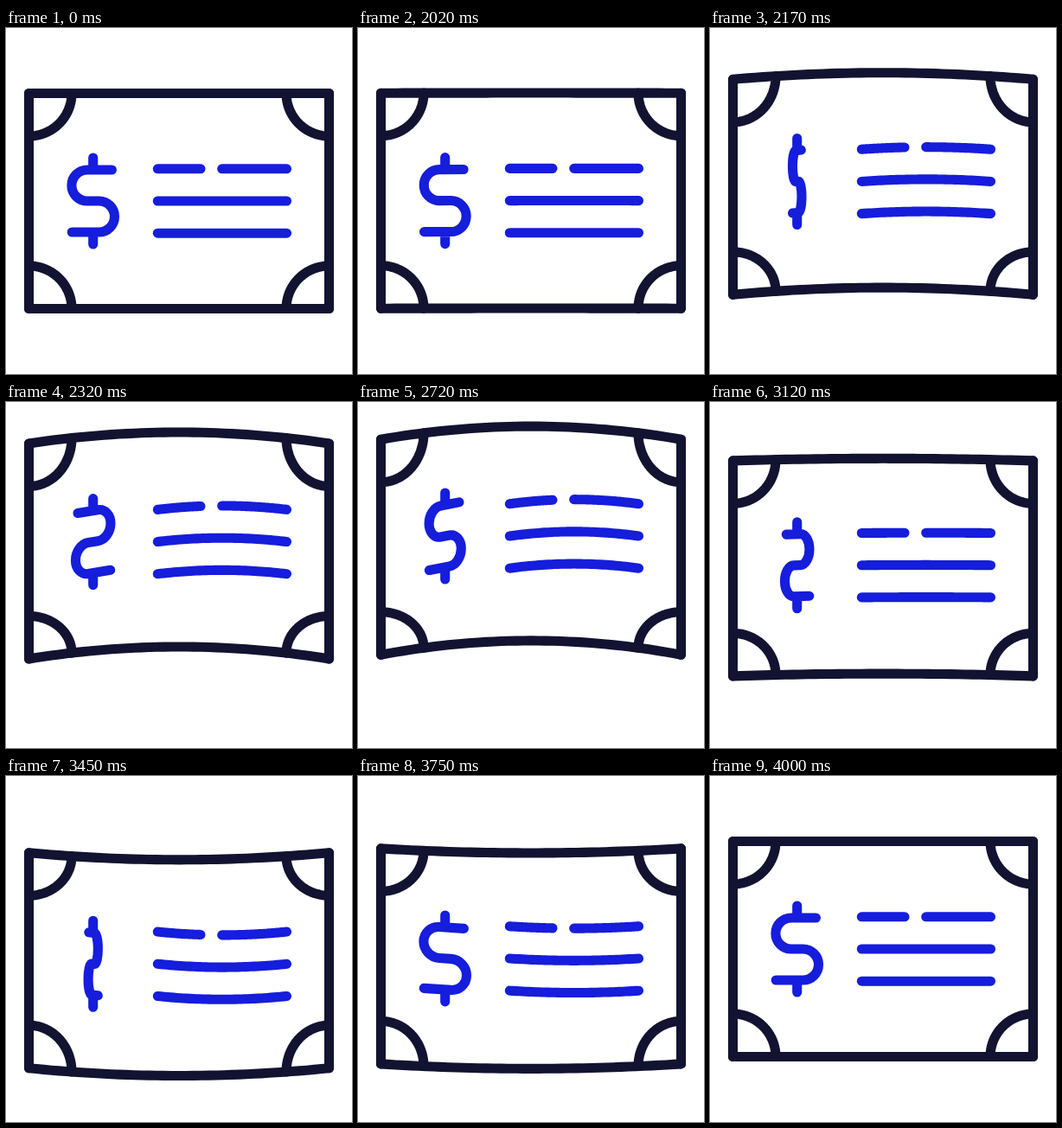
These frames come from a looping animation (400x400 px, 4.02 s). An HTML page with a canvas:

```html
<!DOCTYPE html>
<html lang="en">
<head>
<meta charset="utf-8">
<title>Banknote</title>
<style>
  html, body { margin: 0; height: 100%; overflow: hidden; background: #fff; }
  canvas { display: block; }
</style>
</head>
<body>
<canvas id="stage" width="400" height="400"></canvas>
<script>
const ctx = document.getElementById('stage').getContext('2d');
const LOOP = 4020, NAVY = '#121331', BLUE = '#161ddb';
const LEFT = 26.5, RIGHT = 373.5, TOP = 75.5, BOTTOM = 324.5, RADIUS = 49.5;

// Offsets: note edge, note bend, ink (dollar and lines), line bend
const REST = [0, 0, 0, 0];
const HIGH = [-33, 15.5, -46, 5.3];
const LOW = [14, -8.5, 18.3, -4];

// Each move: start, end, poses, and x of the two easing handles
const MOVES = [
  [2000, 2600, REST, HIGH, 0.22, 0.22],
  [2600, 3560, HIGH, LOW, 0.62, 0.45],
  [3560, 4000, LOW, REST, 0.333, 0.667]
];

function ease(u, x1, x2) {
  let lo = 0, hi = 1, s;
  for (let i = 0; i < 24; i++) {
    s = (lo + hi) / 2;
    const r = 1 - s;
    if (3 * s * r * r * x1 + 3 * s * s * r * x2 + s ** 3 < u) lo = s;
    else hi = s;
  }
  return s * s * (3 - 2 * s);
}

function poseAt(ms) {
  const move = MOVES.find(m => ms >= m[0] && ms < m[1]);
  if (!move) return REST;
  const [start, end, from, to, x1, x2] = move;
  const k = ease((ms - start) / (end - start), x1, x2);
  return from.map((v, i) => v + (to[i] - v) * k);
}

// Strokes a parametric curve, u from 0 to 1
function curve(point, steps = 40) {
  ctx.beginPath();
  for (let i = 0; i <= steps; i++) ctx.lineTo(...point(i / steps));
  ctx.stroke();
}

function drawNote(dy, bend) {
  ctx.strokeStyle = NAVY;
  // The lower edge bends slightly more than the upper one
  for (const [y, inward, sag] of [[TOP, 1, bend], [BOTTOM, -1, bend * 1.08]]) {
    const edge = x => y + dy - sag * (1 - ((x - 200) / 173.5) ** 2);
    curve(u => {
      const x = LEFT + (RIGHT - LEFT) * u;
      return [x, edge(x)];
    });
    for (const [x, dx] of [[LEFT, RADIUS], [RIGHT, -RADIUS]]) {
      const base = edge(x + dx), rise = y + dy + RADIUS * inward - base;
      curve(u => [x + dx * Math.cos(u * Math.PI / 2), base + rise * Math.sin(u * Math.PI / 2)]);
    }
  }
  for (const x of [LEFT, RIGHT]) curve(u => [x, TOP + dy + (BOTTOM - TOP) * u], 1);
}

function drawLines(dy, bend) {
  const line = (x1, x2, y) => curve(u => {
    const x = x1 + (x2 - x1) * u;
    return [x, y + dy - bend * (1 - ((x - 250) / 75) ** 2)];
  });
  ctx.strokeStyle = BLUE;
  line(175.3, 225, 162.8);
  line(249.7, 324.5, 162.8);
  line(175.3, 324.5, 200);
  line(175.3, 324.5, 237.2);
}

function drawDollar(dy, bend, flip) {
  ctx.beginPath();
  // Only the path is squeezed and slanted; the pen keeps its width
  ctx.setTransform(flip, -0.0127 * bend * flip, 0, 1, 100.7, 200 + dy);
  ctx.moveTo(21.7, -36);
  ctx.lineTo(-6.8, -36);
  ctx.arc(-6.8, -18, 18, -Math.PI / 2, Math.PI / 2, true);
  ctx.lineTo(6.8, 0);
  ctx.arc(6.8, 18, 18, -Math.PI / 2, Math.PI / 2);
  ctx.lineTo(-24.5, 36);
  for (const side of [-1, 1]) {
    ctx.moveTo(0, 50 * side);
    ctx.lineTo(0, 36 * side);
  }
  ctx.resetTransform();
  ctx.stroke();
}

function draw() {
  const ms = performance.now() % LOOP;
  const [dy, bend, inkY, lineBend] = poseAt(ms);
  const t = Math.max(0, ms - 2000) / 1000;
  const angle = Math.min(4 * Math.PI, 8 * t - 0.4 * t * t);

  ctx.clearRect(0, 0, 400, 400);
  ctx.lineWidth = 11.1;
  ctx.lineCap = ctx.lineJoin = 'round';
  drawNote(dy, bend);
  drawLines(inkY, lineBend);
  drawDollar(inkY, bend, Math.cos(angle));
  requestAnimationFrame(draw);
}
draw();
</script>
</body>
</html>
```
